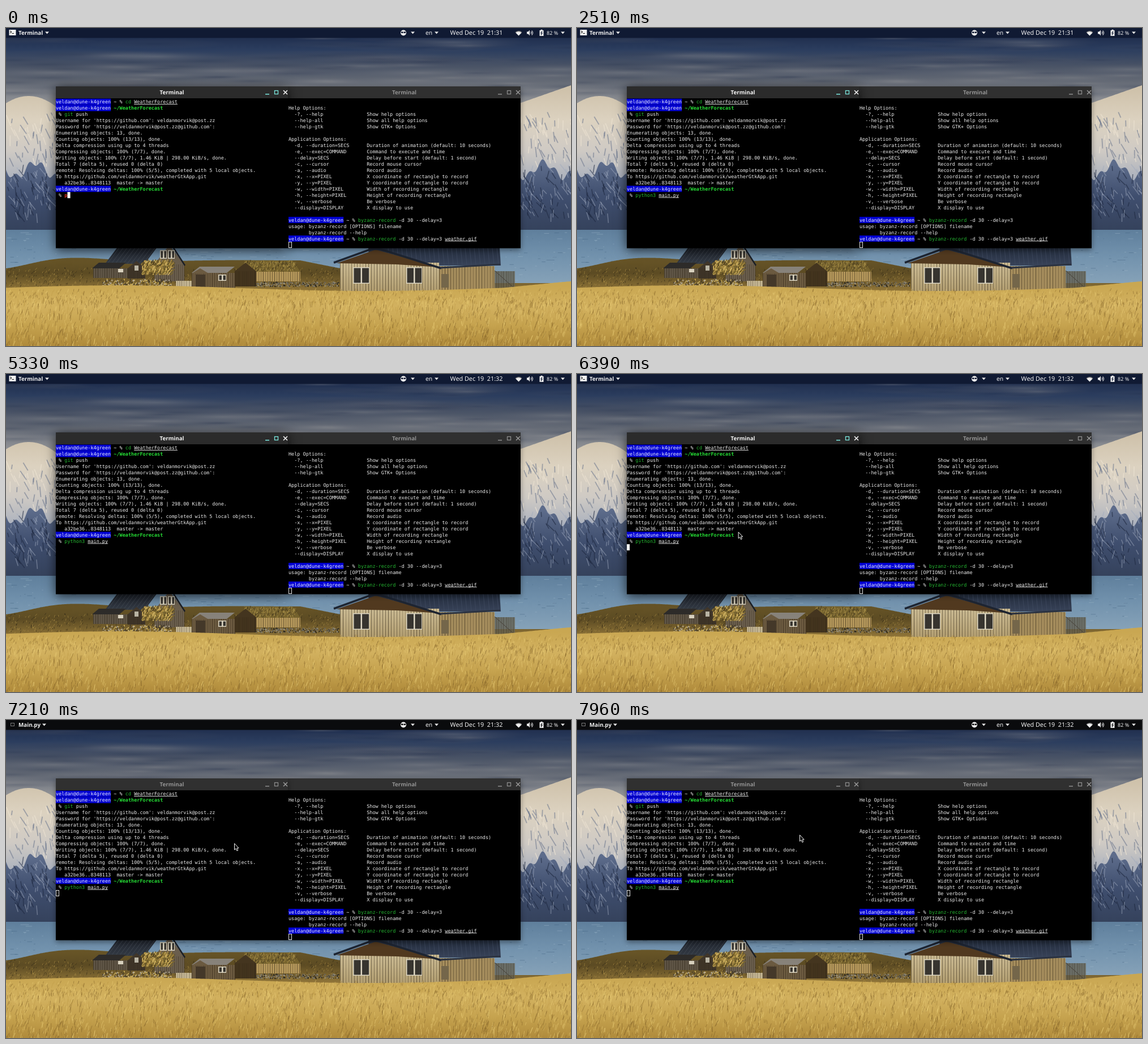
An HTML page with a canvas for the animation above (8000 ms loop, 998x561 px).

```html
<!DOCTYPE html>
<html lang="en">
<head>
<meta charset="utf-8">
<title>Desktop with two terminals</title>
<style>
html, body { margin: 0; width: 100%; height: 100%; overflow: hidden; background: #000; }
canvas { display: block; }
</style>
</head>
<body>
<canvas id="stage" width="998" height="561"></canvas>
<script>
const W = 998, H = 561, LOOP = 8000;
const stage = document.getElementById('stage');
let g;

let seed = 11;
const rnd = (a = 0, b = 1) => a + (b - a) * ((seed = seed * 16807 % 2147483647) / 2147483647);

function rect(x, y, w, h, color) {
  g.fillStyle = color;
  g.fillRect(x, y, w, h);
}
function box(x, y, w, h, color, width = 1) {
  g.strokeStyle = color;
  g.lineWidth = width;
  g.strokeRect(x, y, w, h);
}
function poly(color, ...p) {
  g.fillStyle = color;
  g.beginPath();
  for (let i = 0; i < p.length; i += 2) g.lineTo(p[i], p[i + 1]);
  g.closePath();
  g.fill();
}
function line(color, width, ...p) {
  g.strokeStyle = color;
  g.lineWidth = width;
  g.beginPath();
  for (let i = 0; i < p.length; i += 2) g.lineTo(p[i], p[i + 1]);
  g.stroke();
}
function fade(y0, y1, ...colors) {
  const f = g.createLinearGradient(0, y0, 0, y1);
  colors.forEach((c, i) => f.addColorStop(i / (colors.length - 1), c));
  return f;
}

// Area below the curve f(x)
function ridge(color, x0, x1, f, bottom) {
  const p = [x1, bottom, x0, bottom];
  for (let x = x0; x <= x1; x += 2) p.push(x, f(x));
  poly(color, ...p, x1, f(x1));
}
function slab(color, x, y, w, h, lean) {
  poly(color, x, y, x + w, y, x + w + lean, y + h, x + lean, y + h);
}
function boards(x, y, w, h, gap = 4) {
  for (let i = 0; i < w; i += gap) rect(x + i, y, 1, h, `rgba(40,30,15,${rnd(.2, .6)})`);
}
function wall(color, x, y, w, h, gap) {
  rect(x, y, w, h, color);
  boards(x, y, w, h, gap);
}
function gable(color, x, y, w, h, peak) {
  wall(color, x, y, w, h, 3.5);
  poly(color, x, y, x + w / 2, y - peak, x + w, y);
}
function pane(x, y, w, h) {
  rect(x, y, w, h, '#ddd6c2');
  for (const side of [0, 1]) rect(x + 1.5 + side * w / 2, y + 1.5, w / 2 - 2.5, h - 3, '#37342f');
}
// Random short strokes inside a box, leaning by dx, dy
function strokes(n, x, y, w, h, dx, dy, colors, width = 1) {
  for (let i = 0; i < n; i++) {
    const a = x + rnd() * w, b = y + rnd() * h, k = rnd(.4, 1);
    line(colors[i % colors.length], width, a, b, a + dx * k * rnd(-.3, 1), b + dy * k);
  }
}

function sky() {
  rect(0, 0, W, 180, fade(10, 150, '#1d2b4a', '#2b3d5e', '#485265', '#646a75', '#85888e', '#a5a4a4'));
  for (let i = 0; i < 90; i++) {
    const y = rnd(18, 118), r = rnd(50, 150), light = rnd() < y / 200;
    g.save();
    g.translate(rnd(0, W), y);
    g.scale(r, r / 14);
    const f = g.createRadialGradient(0, 0, 0, 0, 0, 1);
    f.addColorStop(0, light ? 'rgba(150,150,152,.3)' : 'rgba(38,50,76,.28)');
    f.addColorStop(1, 'rgba(90,95,110,0)');
    rect(-1, -1, 2, 2, f);
    g.restore();
  }
}

function mountains() {
  const tops = [x => 120 + (x - 40) ** 2 / 125, x => 101 + (W - x) * .35];
  const foot = x => 250 + 13 * Math.sin(x / 11) + 6 * Math.sin(x / 3.7);
  [0, 908].forEach((x, i) => {
    ridge(fade(110, 270, '#cfc2ab', '#dcd2c0', '#cfcac4', '#a9b0bd'), x, x + 90, tops[i], 300);
    strokes(60, x, 145, 90, 90, 14, 20, ['rgba(105,116,140,.55)', 'rgba(236,227,210,.6)'], 1.8);
    ridge(fade(240, 356, '#5d6c8b', '#3f4e6e', '#35425c'), x, x + 90, foot, 358);
    strokes(80, x, 240, 90, 90, 18, 17, ['rgba(30,40,64,.6)', 'rgba(160,170,190,.5)'], 1.5);
  });
}

function water() {
  rect(0, 356, W, 105, fade(356, 450, '#5f7f9c', '#7292ad', '#86a2b8'));
  strokes(400, 0, 358, W, 95, 16, 0, ['rgba(160,184,202,.4)', 'rgba(62,92,122,.4)']);
}

function land() {
  const shore = x => x < 520 ? 410 + 14 * Math.cos(x / 45) * Math.exp(-x / 120) : 410 + 40 * Math.min(1, (x - 520) / 200);
  ridge(fade(400, 465, '#6b5828', '#5c4b23', '#94783a'), 0, W, shore, 475);
  strokes(900, 0, 425, 600, 33, 4, -4, ['rgba(42,35,20,.6)', 'rgba(190,158,78,.5)', 'rgba(110,88,38,.6)']);
}

function leftHouses() {
  gable('#6a5e4d', 262, 417, 53, 30, 34);
  slab(fade(388, 416, '#1f242d', '#333a44'), 196, 388, 70, 28, -21);
  for (let x = 200; x < 264; x += 7) line('#454b54', .8, x, 388, x - 21, 416);
  line('#1b1f26', 2.5, 296, 388, 316, 419);
  pane(272, 392, 12, 15);
  pane(286, 392, 12, 15);
  wall('#5e5445', 154, 424, 63, 17);
  slab('#2d2b29', 164, 414, 48, 10, -12);
  rect(198, 425, 9, 6, '#d8d1be');
  gable('#40362a', 215, 424, 31, 18, 13);
  rect(227, 419, 7, 9, '#b8b3a3');
  strokes(450, 240, 414, 52, 22, 9, -7, ['#7b672d', '#cdb060', '#5a4a24', '#a98b42'], 1.6);
  strokes(220, 170, 444, 122, 14, 4, -3, ['#b3a890', '#463c29', '#c9ac58'], 1.8);
  wall('#cfc09c', 300, 446, 31, 12, 3);
}

function barns() {
  wall('#6b5a40', 328, 432, 77, 27);
  slab('#87827a', 342, 421, 62, 11, -14);
  gable('#6b5a40', 328, 433, 30, 26, 9);
  rect(335, 435, 17, 22, '#443829');
  pane(375, 435, 14, 11);
  wall('#b3965a', 442, 429, 78, 18);
  slab('#75622d', 420, 410, 86, 20, 14);
  strokes(350, 420, 414, 92, 17, 4, -5, ['#a58d48', '#4c3f20', '#866f34']);
  gable('#44351f', 404, 429, 38, 27, 15);
  strokes(300, 440, 448, 148, 8, 4, 1, ['#6a6558', '#98917f', '#2c281f'], 2);
}

function rightHouse() {
  slab(fade(388, 420, '#222b3b', '#39445a'), 640, 388, 232, 31, 2);
  for (let x = 675; x < 872; x += 8) line('#414d62', .7, x, 388, x + 3, 418);
  wall('#a48c5c', 765, 420, 98, 47, 5);
  wall(fade(412, 465, '#cbbb94', '#b19d70'), 590, 414, 175, 51, 5);
  poly('#51391f', 584, 415, 653, 391, 765, 422, 690, 417);
  line('#1d2431', 3.5, 579, 414, 645, 390, 661, 390, 769, 424);
  line('#2b3240', 3, 767, 423, 873, 417);
  pane(613, 422, 29, 29);
  pane(707, 422, 28, 29);
  rect(769, 434, 13, 24, '#74664a');
  wall('rgba(105,100,85,.75)', 863, 429, 36, 38, 3);
  line('#453f36', 1, 863, 428, 899, 460);
}

function meadow() {
  const edge = x => 459 + 5 * Math.sin(x / 140 - 3) - 8 * Math.max(0, x - 880) / 118;
  ridge(fade(455, 561, '#c9a752', '#d2b15f', '#c5a24e', '#af8a3b'), 0, W, edge, H);
  const shades = ['rgba(238,210,122,.5)', 'rgba(118,88,34,.45)', 'rgba(190,153,70,.5)'];
  strokes(1200, 0, 464, W, 26, 3, -6, shades);
  strokes(3000, 0, 485, W, 90, 6, -12, shades);
}

function makeScene() {
  const c = document.createElement('canvas');
  c.width = W;
  c.height = H;
  g = c.getContext('2d');
  [sky, mountains, water, land, leftHouses, barns, rightHouse, meadow].forEach(f => f());
  return c;
}

// Terminal text sits on a fixed character grid
const CW = 5.117, CH = 10.97, TOP = 124.7;
const MONO = "8.5px 'DejaVu Sans Mono', monospace";
const STYLE = {
  w: { color: '#ececec' },
  p: { color: '#eef2ff', back: '#0000d2' },
  g: { color: '#25b832' },
  b: { color: '#25dc35', bold: true },
  r: { color: '#e03226', bold: true },
  u: { color: '#ececec', under: true }
};
function row(x, n, ...parts) {
  const y = TOP + n * CH;
  let col = 0;
  g.textAlign = 'left';
  for (const [text, kind = 'w'] of parts) {
    const s = STYLE[kind], left = x + col * CW;
    if (s.back) rect(left, y, text.length * CW, CH, s.back);
    g.fillStyle = s.color;
    g.font = (s.bold ? 'bold ' : '') + MONO;
    [...text].forEach((ch, i) => g.fillText(ch, left + i * CW, y + 8.6));
    if (s.under) rect(left, y + 9.4, text.length * CW, .9, s.color);
    col += text.length;
  }
}
function block(x, n, col, hollow) {
  const left = x + col * CW, y = TOP + n * CH;
  if (hollow) box(Math.round(left) + .5, Math.round(y) + .5, 5, 10, '#e4e4e4');
  else rect(left, y, CW, CH, '#f4f4f4');
}

const HOST = ['veldan@dune-k4green', 'p'], DIR = ['~/WeatherForecast', 'b'];
const LOG = `Username for 'https://github.com': veldanmorvik@post.zz
Password for 'https://veldanmorvik@post.zz@github.com':
Enumerating objects: 13, done.
Counting objects: 100% (13/13), done.
Delta compression using up to 4 threads
Compressing objects: 100% (7/7), done.
Writing objects: 100% (7/7), 1.46 KiB | 298.00 KiB/s, done.
Total 7 (delta 5), reused 0 (delta 0)
remote: Resolving deltas: 100% (5/5), completed with 5 local objects.
To https://github.com/veldanmorvik/weatherGtkApp.git
   a32be36..8348113  master -> master`.split('\n');
const HELP = `Help Options:
  -?, --help               Show help options
  --help-all               Show all help options
  --help-gtk               Show GTK+ Options

Application Options:
  -d, --duration=SECS      Duration of animation (default: 10 seconds)
  -e, --exec=COMMAND       Command to execute and time
  --delay=SECS             Delay before start (default: 1 second)
  -c, --cursor             Record mouse cursor
  -a, --audio              Record audio
  -x, --x=PIXEL            X coordinate of rectangle to record
  -y, --y=PIXEL            Y coordinate of rectangle to record
  -w, --width=PIXEL        Width of recording rectangle
  -h, --height=PIXEL       Height of recording rectangle
  -v, --verbose            Be verbose
  --display=DISPLAY        X display to use`.split('\n');

const COMMAND = 'python3 main.py ';
const COMPLETE = 2040, CLOCK = 4620, ENTER = 4770, BLUR = 7150, BLINK = 590;
const clamp = (v, a, b) => Math.min(b, Math.max(a, v));

// Keys come in bursts; the file name is completed at once
function typedCount(t) {
  if (t >= COMPLETE) return COMMAND.length;
  const burst = (from, gap, n) => clamp(Math.floor((t - from) / gap) + 1, 0, n);
  return 1 + burst(80, 60, 3) + burst(350, 170, 2) + burst(750, 130, 2) + burst(1520, 135, 3);
}
function cursorDark(t) {
  const blink = (from, to) => t >= from && t < to && Math.floor((t - from) / BLINK) % 2 === 0;
  return blink(1420, 1520) || blink(2510, ENTER) || blink(5330, BLUR);
}

function leftTerminal(t, focused) {
  const x = 88;
  row(x, 0, HOST, [' ~ % '], ['cd', 'g'], [' '], ['WeatherForecast', 'u']);
  row(x, 1, HOST, [' '], DIR);
  row(x, 2, [' % '], ['git', 'g'], [' push']);
  LOG.forEach((s, i) => row(x, 3 + i, [s]));
  row(x, 14, HOST, [' '], DIR);
  const n = typedCount(t), text = COMMAND.slice(0, n);
  row(x, 15, [' % '], [text.slice(0, 7), n < 6 ? 'r' : 'g'], [' '], [text.slice(8).trim(), 'u']);
  if (cursorDark(t)) return;
  if (t < ENTER) block(x, 15, 3 + n);
  else block(x, 16, 0, !focused);
}
function rightTerminal() {
  const x = 499, call = [HOST, [' ~ % '], ['byzanz-record', 'g'], [' -d 30 --delay=3']];
  HELP.forEach((s, i) => row(x, 1 + i, [s]));
  row(x, 19, ...call);
  row(x, 20, ['usage: byzanz-record [OPTIONS] filename']);
  row(x, 21, ['       byzanz-record --help']);
  row(x, 22, ...call, [' '], ['weather.gif', 'u']);
  block(x, 23, 0, true);
}

function label(text, x, y, font, color, align = 'left') {
  g.font = font + " 'Noto Sans', 'Open Sans', sans-serif";
  g.textAlign = align;
  g.fillStyle = color;
  g.fillText(text, x, y);
}
function frameWindow(x, w, focused) {
  g.save();
  g.shadowColor = focused ? 'rgba(0,0,0,.7)' : 'rgba(0,0,0,.4)';
  g.shadowBlur = focused ? 18 : 9;
  g.shadowOffsetY = 3;
  rect(x, 103, w, 285.5, '#000');
  g.restore();
  rect(x, 103, w, 21, focused ? '#2b2b2b' : '#303030');
  label('Terminal', x + w / 2, 117.4, 'bold 9.8px', focused ? '#f2f2f2' : '#929292', 'center');
  const r = x + w, tint = focused ? '#7be8df' : '#8c8c8c', cross = focused ? '#fff' : '#9a9a9a';
  rect(r - 40, 116, 7, 1.5, tint);
  box(r - 23.5, 110.5, 6, 6, tint, 1.3);
  line(cross, 1.4, r - 8, 110, r - 1, 117);
  line(cross, 1.4, r - 1, 110, r - 8, 117);
}

const arrow = x => poly('#e8e8e8', x, 6.5, x + 7, 6.5, x + 3.5, 10.5);
function wedge(x, y, r, color, from = 0, to = 7) {
  g.fillStyle = color;
  g.beginPath();
  g.moveTo(x, y);
  g.arc(x, y, r, from, to);
  g.fill();
}
function panel(t, focused) {
  const ink = '#f0f0f0', back = focused ? '#101a33' : '#0a0b0d';
  rect(0, 0, W, 17.5, back);
  if (focused) {
    rect(5.5, 3, 12, 10, ink);
    line('#222', 1.1, 7.5, 5, 9.5, 7, 7.5, 9);
    rect(10.5, 9, 3.5, 1.1, '#222');
  } else box(8.5, 5.5, 6, 5, '#777');
  label(focused ? 'Terminal' : 'Main.py', 22, 12.2, 'bold 9.8px', ink);
  [focused ? 69 : 64, 715, 757, 980].forEach(arrow);

  wedge(702, 8.5, 5, ink);
  for (const x of [698, 702.5]) rect(x, 6.5, 3.5, 2.6, back);
  label('en', 741, 12.2, '500 10.4px', ink);
  label('Wed Dec 19\u00a0 21:3' + (t < CLOCK ? 1 : 2), 831, 12.4, '500 10.8px', ink, 'center');

  wedge(905.5, 13.5, 8.5, '#858585', -2.36, -.78);
  wedge(905.5, 13.5, 7, ink, -2.36, -.78);
  rect(920, 6.5, 3, 4, ink);
  poly(ink, 921, 8.5, 925, 3.5, 925, 13.5);
  for (const r of [2.5, 5]) {
    g.strokeStyle = ink;
    g.lineWidth = 1.1;
    g.beginPath();
    g.arc(925.5, 8.5, r, -.9, .9);
    g.stroke();
  }
  rect(942.5, 4, 7, 10, ink);
  rect(944.5, 2.8, 3, 2, ink);
  line(back, 1.2, 947, 5.5, 945, 9, 947, 9, 945, 12.5);
  label('82 %', 955, 12, '500 9px', ink);
}

function pointer(t) {
  if (t < 6230) return;
  const part = (from, to) => clamp((t - from) / (to - from), 0, 1);
  const rise = part(6230, 6510), cross = part(6860, 7070), lift = part(7230, 7530), drop = part(7800, 7960);
  g.save();
  g.translate(276 + 15 * rise + 112 * cross - 11.5 * lift + 1.5 * drop,
    293 - 26 * rise - 50 * cross - 39 * lift + 24 * drop);
  const shape = new Path2D('M.5 .8V12L3 9.8 4.9 13.8 6.8 12.9 5 9H8.2Z');
  g.fillStyle = '#080808';
  g.fill(shape);
  g.strokeStyle = '#f4f4f4';
  g.lineWidth = 1;
  g.stroke(shape);
  g.restore();
}

const scene = makeScene();
g = stage.getContext('2d');
g.textRendering = 'geometricPrecision';
const start = performance.now();

function draw() {
  const t = (performance.now() - start) % LOOP, focused = t < BLUR;
  g.drawImage(scene, 0, 0);
  panel(t, focused);
  frameWindow(498, 411, false);
  frameWindow(88, 410, focused);
  leftTerminal(t, focused);
  rightTerminal();
  pointer(t);
  requestAnimationFrame(draw);
}
draw();
</script>
</body>
</html>
```
